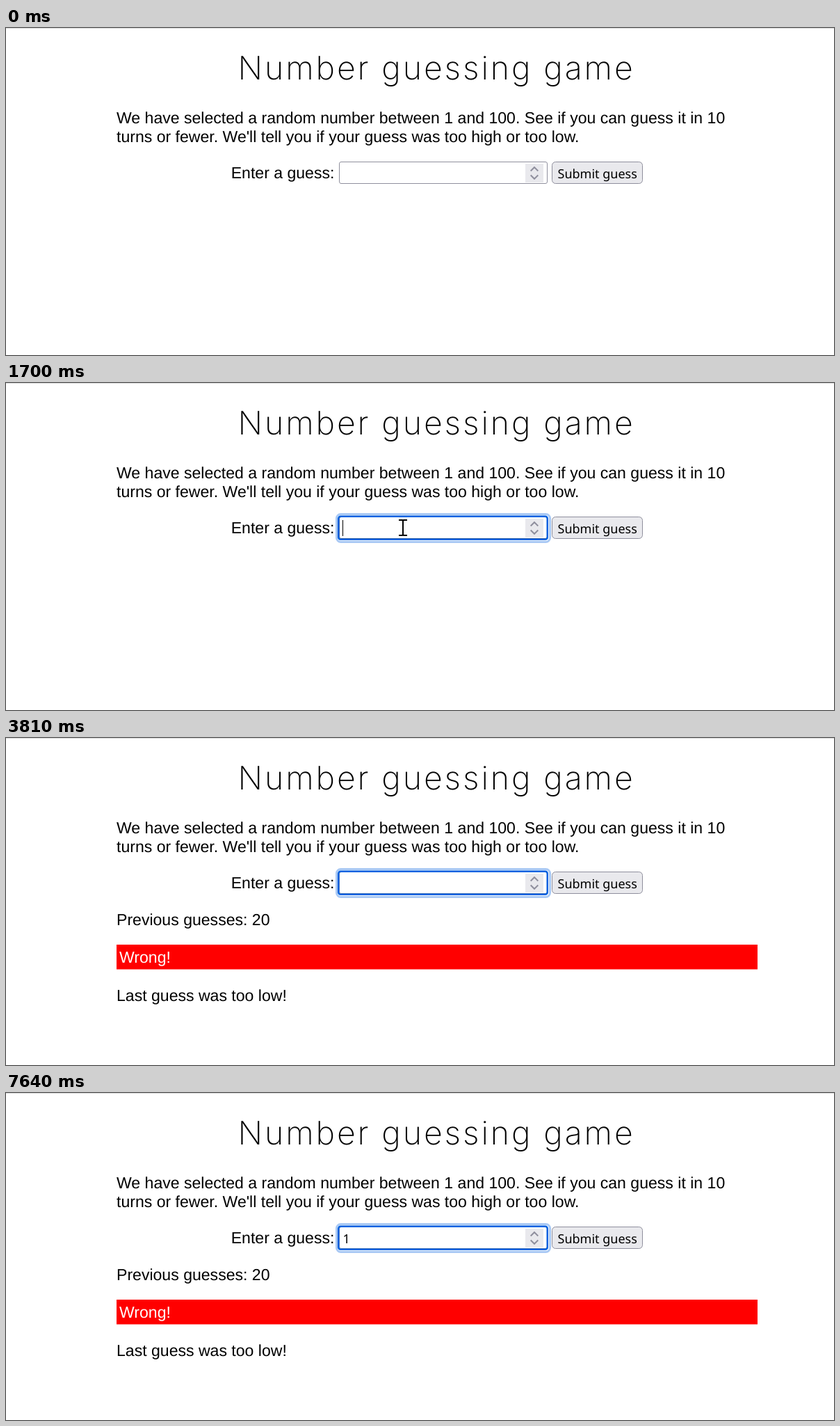
Animation, 1191 px wide and 470 px high, one loop 8 s. Source, as an HTML page:

```html
<!DOCTYPE html>
<html lang="en">
<head>
<meta charset="utf-8">
<title>Number guessing game</title>
<style>
  html, body { margin: 0; width: 100%; height: 100%; overflow: hidden; background: #fff; }
  svg { display: block; }
  text { font: 23.07px "Liberation Sans", Arial, sans-serif; white-space: pre; text-rendering: geometricPrecision; }
  .title { font: 200 46.5px Inter, sans-serif; letter-spacing: 2.9px; }
  .control { font: 18px "Noto Sans", sans-serif; }
</style>
</head>
<body>
<svg width="1191" height="470" viewBox="0 0 1191 470">
  <rect width="1191" height="1" fill="#dedede"/>
  <text class="title" x="333.5" y="74">Number guessing game</text>
  <text x="159" y="137">We have selected a random number between 1 and 100. See if you can guess it in 10</text>
  <text x="159" y="164">turns or fewer. We'll tell you if your guess was too high or too low.</text>
  <text x="323.7" y="216">Enter a guess:</text>

  <rect id="box" x="479.5" y="192.5" width="299" height="31" rx="2.5" fill="#fff" stroke="#8f8f9d"/>
  <g id="ring" fill="none">
    <rect x="475.5" y="188.5" width="307" height="40" rx="6" stroke="#a9c9f4" stroke-width="3"/>
    <rect x="478.25" y="191.75" width="300.5" height="33" rx="3" stroke="#0061e0" stroke-width="2.5"/>
  </g>
  <rect x="747" y="195" width="26" height="27" fill="#e9e9ed"/>
  <path d="M754.7 205.5l5.3-5.3 5.3 5.3M754.7 211.5l5.3 5.3 5.3-5.3" fill="none" stroke="#8f8f9d" stroke-width="2"/>
  <text id="entry" class="control" x="484.5" y="216"></text>
  <rect id="caret" y="197" width="1" height="23"/>

  <rect x="785.5" y="192.5" width="130" height="31" rx="5" fill="#e9e9ed" stroke="#8f8f9d"/>
  <text class="control" x="793.5" y="216">Submit guess</text>

  <g id="result">
    <text x="159" y="269">Previous guesses: 20</text>
    <rect x="159" y="297" width="922" height="35.5" fill="red"/>
    <text x="163" y="323" fill="#fff">Wrong!</text>
    <text x="159" y="378">Last guess was too low!</text>
  </g>

  <path id="arrow" d="M.5.5v23l5.3-5 3.6 8.2 3.6-1.6-3.5-8h7.2z" fill="#fff" stroke="#000"/>
  <path id="beam" d="M-6-11h5l1 1 1-1h5M0-10v20M-6 11h5l1-1 1 1h5" fill="none" stroke="#000" stroke-width="2"/>
</svg>
<script>
  const LOOP = 8000;
  const el = id => document.getElementById(id);
  const show = (id, on) => el(id).style.display = on ? "" : "none";
  const within = (t, from, to) => t >= from && t < to;

  // Typed value and caret position, by start time
  const typing = [[0, "", 484], [3000, "2", 495], [3210, "20", 506], [3810, "", 484], [7440, "1", 495]];
  const caretOn = [[1700, 2200], [2800, 3300], [4410, 4930], [5430, 6030], [6540, 7040], [7440, 7640]];

  const bezier = (a, b, c, p) => a * (1 - p) ** 2 + 2 * b * p * (1 - p) + c * p * p;

  // Eased curve from the lower right into the field, in steps of about 100 ms
  function pointer(t) {
    const step = Math.floor((t - 690) / 98.75 + 1e-6);
    const s = Math.max(0, Math.min(1, step / 6));
    const p = s * s * (3 - 2 * s);
    return [bezier(931, 560, 571, p), bezier(403, 240, 208, p)];
  }

  function draw(t) {
    const [x, y] = pointer(t);
    const visible = within(t, 690, 3000);
    const hover = visible && y < 224;
    for (const id of ["arrow", "beam"]) el(id).setAttribute("transform", `translate(${x} ${y})`);
    show("arrow", visible && !hover);
    show("beam", hover);
    el("box").setAttribute("stroke", hover ? "#676774" : "#8f8f9d");
    show("ring", t >= 1700);
    show("result", t >= 3810);

    const [, value, caretX] = typing.findLast(([start]) => t >= start);
    el("entry").textContent = value;
    el("caret").setAttribute("x", caretX);
    show("caret", caretOn.some(([from, to]) => within(t, from, to)));
  }

  function frame(now) {
    draw(now % LOOP);
    requestAnimationFrame(frame);
  }
  draw(0);
  requestAnimationFrame(frame);
</script>
</body>
</html>
```
